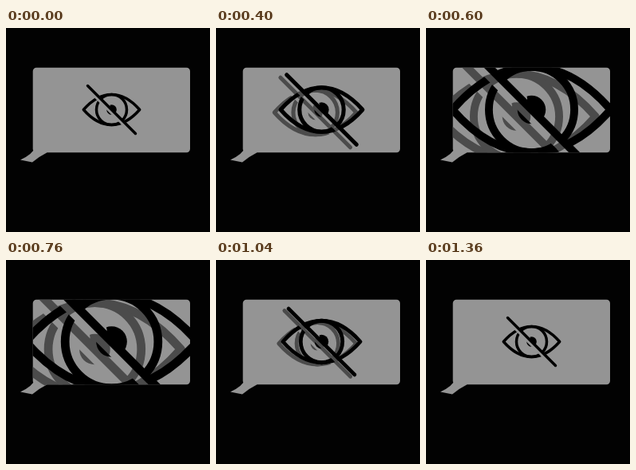
Animation of 256 by 256 pixels, one loop 1640 ms. Source, as an HTML page with a canvas:

```html
<!DOCTYPE html>
<html lang="en">
<head>
<meta charset="utf-8">
<title>Hidden message</title>
<style>
  html, body { margin: 0; width: 100%; height: 100%; overflow: hidden; background: #020202; }
  canvas { display: block; width: 100vw; height: 100vh; }
</style>
</head>
<body>
<canvas id="stage" width="256" height="256"></canvas>
<script>
const ctx = document.getElementById('stage').getContext('2d');
const LOOP = 1640, STEP = 40;
const BACKDROP = '#020202', GREY = '#949494', SHADE = '#4b4b4b', INK = '#000';
const CENTER = { x: 132.5, y: 102.5 };

// time in ms, icon scale, shadow distance
const KEYS = [
  [0, 1, 0], [160, 1.05, 3], [320, 1.22, 6], [400, 1.46, 7.8], [600, 2.82, 19],
  [720, 3.2, 22], [880, 2.34, 15.5], [1040, 1.38, 5.2], [1120, 1.18, 2.8], [1360, 1, 0]
];

function slope(i, field) {
  if (i === 0 || i === KEYS.length - 1) return 0;
  const a = KEYS[i - 1], b = KEYS[i + 1];
  return (b[field] - a[field]) / (b[0] - a[0]);
}

// Smooth Hermite curve through the keys
function valueAt(time, field) {
  const last = KEYS.length - 1;
  if (time >= KEYS[last][0]) return KEYS[last][field];
  const i = KEYS.findIndex(key => key[0] > time) - 1;
  const a = KEYS[i], b = KEYS[i + 1];
  const span = b[0] - a[0], u = (time - a[0]) / span;
  const u2 = u * u, u3 = u2 * u;
  return (2 * u3 - 3 * u2 + 1) * a[field] + (3 * u2 - 2 * u3) * b[field]
    + span * ((u3 - 2 * u2 + u) * slope(i, field) + (u3 - u2) * slope(i + 1, field));
}

const bubble = new Path2D();
bubble.roundRect(33.7, 49.7, 197.3, 106.6, 4.5);
bubble.addPath(new Path2D('M36 150L52 156Q42 161 33 168.5L18 165.5Q34 158 36 150Z'));

const lids = new Path2D('M-35.2 0C-24-12.8-12-19 0-19S24-12.8 35.2 0C24 12.8 12 19 0 19S-24 12.8-35.2 0Z');
const slash = new Path2D('M-30-30L30 30');
const iris = new Path2D();
iris.arc(0, 0, 19, 0, Math.PI * 2);
const pupil = new Path2D();
pupil.arc(0, 0, 6.3, 0, Math.PI * 2);

// Everything except the glint, and except the gap beside the slash
const outsideGlint = new Path2D('M-60-60H60V60H-60Z');
outsideGlint.moveTo(-1.9, -4.8);
outsideGlint.arc(-4.8, -4.8, 2.9, 0, Math.PI * 2);
const outsideGap = new Path2D('M-60-60H60V60H-60ZM-40-40L40 40L36.8 43.2L-43.2-36.8Z');

function drawIcon(x, y, scale, color) {
  ctx.save();
  ctx.translate(x, y);
  ctx.scale(scale, scale);
  ctx.strokeStyle = ctx.fillStyle = color;
  ctx.lineWidth = 3.5;
  ctx.lineCap = ctx.lineJoin = 'round';

  ctx.save();
  ctx.clip(outsideGap, 'evenodd');
  ctx.stroke(lids);
  ctx.stroke(iris);
  ctx.clip(outsideGlint, 'evenodd');
  ctx.fill(pupil);
  ctx.restore();

  ctx.stroke(slash);
  ctx.restore();
}

function draw(time) {
  const scale = valueAt(time, 1), distance = valueAt(time, 2);
  ctx.fillStyle = BACKDROP;
  ctx.fillRect(0, 0, 256, 256);
  ctx.fillStyle = GREY;
  ctx.fill(bubble);

  ctx.save();
  ctx.clip(bubble);
  if (distance > 0) {
    drawIcon(CENTER.x - distance, CENTER.y + distance * 0.45, scale, SHADE);
  }
  drawIcon(CENTER.x, CENTER.y, scale, INK);
  ctx.restore();
}

const start = performance.now();
function tick() {
  const time = (performance.now() - start) % LOOP;
  draw(Math.floor(time / STEP) * STEP);
  requestAnimationFrame(tick);
}
tick();
</script>
</body>
</html>
```
